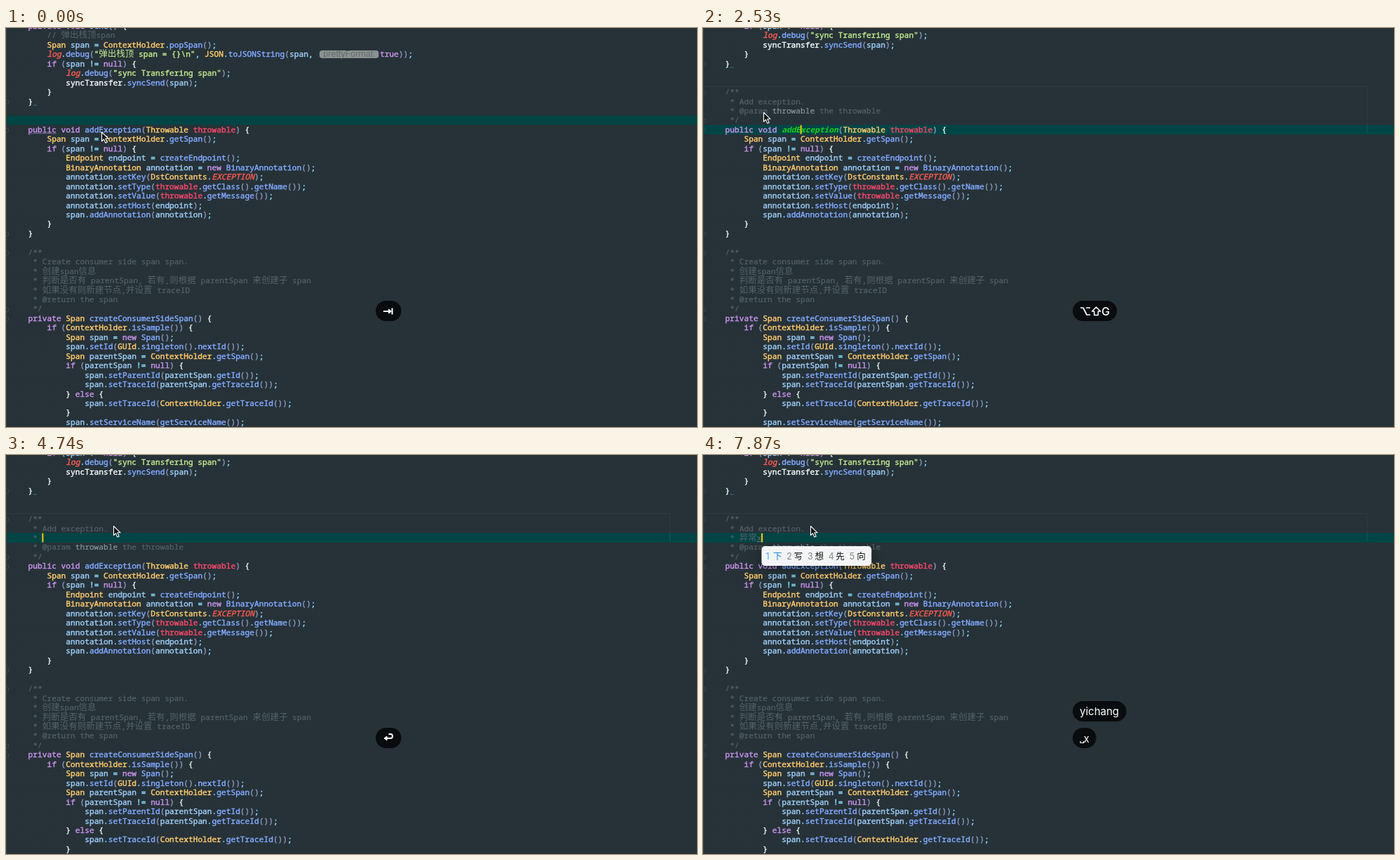
These frames come from a looping animation (985x569 px, 8000 ms). An HTML page with a canvas:

```html
<!DOCTYPE html>
<html lang="zh">
<head>
<meta charset="utf-8">
<title>Javadoc editing</title>
<style>
html, body { margin: 0; width: 100%; height: 100%; overflow: hidden; background: #263238; }
canvas { display: block; }
</style>
</head>
<body>
<canvas id="stage" width="985" height="569"></canvas>
<script>
const ctx = document.getElementById('stage').getContext('2d');
const LOOP = 8000, CW = 6.717, CJK = 12.5, LH = 13.45, LEFT = 31.6, TOP = -3.05;
const MONO = '"Noto Sans Mono", "DejaVu Sans Mono", monospace';
const HAN = '"Noto Sans CJK SC", "Noto Sans CJK", sans-serif';
const UI = 'Inter, "Liberation Sans", sans-serif';

const C = {
  bg: '#263238', row: '#004545', comment: '#546369', param: '#87969b',
  key: '#c792ea', type: '#ffcb6b', call: '#82aaff', local: '#9ccbf5',
  str: '#c3e88d', red: '#f7476a', stat: '#fa5b50', paren: '#8795b8',
  brace: '#e6f0f0', op: '#89ddff', white: '#f4f8f8', hit: '#12cf1e', caret: '#ffcc00'
};

const head = String.raw`private void send() {
    // 弹出栈顶span
    Span span = ContextHolder.popSpan();
    log.debug("弹出栈顶 span = {}\n", JSON.toJSONString(span, §true));
    if (span != null) {
        log.debug("sync Transfering span");
        syncTransfer.syncSend(span);
    }
}

`.split('\n');

const doc = ['/**', ' * Add exception.', ' * @param throwable the throwable', ' */'];

const body = `public void addException(Throwable throwable) {
    Span span = ContextHolder.getSpan();
    if (span != null) {
        Endpoint endpoint = createEndpoint();
        BinaryAnnotation annotation = new BinaryAnnotation();
        annotation.setKey(DstConstants.EXCEPTION);
        annotation.setType(throwable.getClass().getName());
        annotation.setValue(throwable.getMessage());
        annotation.setHost(endpoint);
        span.addAnnotation(annotation);
    }
}

/**
 * Create consumer side span span.
 * 创建span信息
 * 判断是否有 parentSpan, 若有,则根据 parentSpan 来创建子 span
 * 如果没有则新建节点,并设置 traceID
 * @return the span
 */
private Span createConsumerSideSpan() {
    if (ContextHolder.isSample()) {
        Span span = new Span();
        span.setId(GUId.singleton().nextId());
        Span parentSpan = ContextHolder.getSpan();
        if (parentSpan != null) {
            span.setParentId(parentSpan.getId());
            span.setTraceId(parentSpan.getTraceId());
        } else {
            span.setTraceId(ContextHolder.getTraceId());
        }
        span.setServiceName(getServiceName());`.split('\n');

// Timed states: the last entry whose time has passed is in force.
const rows = [[0, 10], [150, 11], [2970, 8], [4600, 9]];
const carets = [[0, 0], [150, 139.1], [600, 0], [1500, 139.1], [1940, 0], [2380, 139.1],
  [2830, 0], [2970, 145.8], [3550, 0], [4000, 145.8], [4600, -1]];
const mouse = [[0, 136, 148], [1790, 128, 142], [1940, 112, 133], [2090, 98, 126],
  [2230, 90, 122], [2380, 86, 120], [2680, 104, 114], [2830, 140, 104], [2970, 153, 101]];
const bulbs = [[0, 0], [1050, 130.5], [1500, 0], [4150, 101.5], [4600, 0]];
const pills = [[0, 'tab', 1], [600, 'tab', .6], [750, 'tab', .25], [900, '', 0],
  [1350, '⌥⇧G', 1], [3410, '⌥⇧G', .5], [3550, '', 0], [4600, 'ret', .6], [4740, 'ret', 1],
  [5790, 'y', 1], [5940, 'yi', 1], [6230, 'yic', 1], [6380, 'yich', 1], [6530, 'yicha', 1],
  [6670, 'yichan', 1], [6820, 'yichang', 1], [7570, '␣', 1], [7870, '␣x', 1]];
const upper = [[0, '', 0], [5790, 'ret', 1], [6530, 'ret', .5], [6670, '', 0], [7570, 'yichang', 1]];
const input = [[0, '', '', ''],
  [5790, '', 'y', '有 一 与 也 要'], [5940, '', 'yi', '一 以 已 亿 意'],
  [6230, '', 'yi c', '溢出 异常 易餐 翼侧 一茶'], [6380, '', 'yi ch', '溢出 异常 一处 一场 一茶'],
  [6530, '', 'yi cha', '异常 一茶 一查 一差 一场'], [6670, '', 'yi chan', '异常 一产 易产 一场 一颤'],
  [6820, '', 'yi chang', '异常 一场 一长 一厂 易常'],
  [7570, '异常', '', ''], [7870, '异常', 'x', '下 写 想 先 向']];

const at = (list, t) => list.filter(e => e[0] <= t).pop();
const rowY = r => TOP + LH * r;
const isHan = s => /[\u2e80-\u9fff]/.test(s);
const width = s => [...s].reduce((w, c) => w + (isHan(c) ? CJK : CW), 0);

// A thin outline gives code its medium weight.
function text(s, x, y, color, font, outline = 0) {
  ctx.font = font;
  ctx.fillStyle = color;
  ctx.fillText(s, x, y);
  if (!outline) return;
  ctx.strokeStyle = color;
  ctx.lineWidth = outline;
  ctx.lineJoin = 'round';
  ctx.strokeText(s, x, y);
}

function box(x, y, w, h, r, color) {
  ctx.fillStyle = color;
  ctx.beginPath();
  ctx.roundRect(x, y, w, h, r);
  ctx.fill();
}

function line(x1, y1, x2, y2, color, w = 1) {
  ctx.strokeStyle = color;
  ctx.lineWidth = w;
  ctx.beginPath();
  ctx.moveTo(x1, y1);
  ctx.lineTo(x2, y2);
  ctx.stroke();
}

// Draws one run on the character grid and returns the next x.
function run(s, x, y, color, style = '500', outline = .45) {
  for (const part of s.match(/[\u2e80-\u9fff]+|[^\u2e80-\u9fff]+/g) || []) {
    if (isHan(part)) text(part, x, y, color, `${CJK}px ${HAN}`);
    else text(part, x, y, color, `${style} ${CW / .6}px ${MONO}`, outline);
    x += width(part);
  }
  return x;
}

function hint(x, y) {
  box(x + 2.5, y - 9.3, 84.5, 11, 4, '#8b9291');
  text('prettyFormat:', x + 8, y - .5, '#626c6d', '12.5px "Liberation Sans", Arial, sans-serif');
  return x + 88.6;
}

function look(tok, next, hot) {
  if (tok[0] === '"') return [C.str];
  if (/^(public|private|void|if|else|new|null|true)$/.test(tok)) return [C.key];
  if (tok === 'log' || tok === 'EXCEPTION') return [C.stat, 'italic 500'];
  if (tok === 'throwable') return [C.red];
  if (tok === 'syncTransfer') return [C.white];
  if (tok === 'addException' && hot) return [C.hit, 'italic 700', 0];
  if (/^\w/.test(tok)) {
    if (next === '(') return [C.call];
    return [/^[A-Z]/.test(tok) ? C.type : C.local];
  }
  if (/[()]/.test(tok)) return [C.paren];
  return [/[{}]/.test(tok) ? C.brace : C.op];
}

function codeLine(s, cy, hot) {
  const y = cy + 4, indent = s.search(/\S/);
  if (indent < 0) return;
  ctx.fillStyle = '#2d3b42';
  for (let i = -4; i < indent; i++) ctx.fillRect(LEFT + CW * (i + .4), cy, 1, 1);
  if (indent < 2 && /^(\/\*|public|private|}| \*\/)/.test(s)) {
    ctx.strokeStyle = '#3a4a51';
    ctx.lineWidth = 1;
    ctx.beginPath();
    ctx.arc(1, cy + 1, 3, -1.5, 1.5);
    ctx.stroke();
  }
  let x = LEFT + CW * indent;
  s = s.slice(indent);
  if (/^(\/|\*)/.test(s)) {
    for (const p of s.split(/(?<=@param )(throwable)/)) {
      x = run(p, x, y, p === 'throwable' ? C.param : C.comment, '500', .2);
    }
    return;
  }
  const toks = s.match(/"[^"]*"|\w+|\s+|[(){}§]|[^\w\s(){}"§]+/g);
  toks.forEach((tok, i) => {
    if (tok === '§') x = hint(x, y);
    else if (/\S/.test(tok)) x = run(tok, x, y, ...look(tok, toks[i + 1], hot));
    else x += width(tok);
  });
}

function icon(d, x, y, w, fill) {
  ctx.save();
  ctx.translate(x, y);
  const p = new Path2D(d);
  if (fill) {
    ctx.fillStyle = fill;
    ctx.fill(p);
  }
  ctx.strokeStyle = '#fff';
  ctx.lineWidth = w;
  ctx.lineJoin = 'round';
  ctx.stroke(p);
  ctx.restore();
}

function pill(name, y, alpha) {
  if (!name) return;
  const x = 527, font = `15px ${UI}`;
  const fixed = { tab: 36.5, ret: 36.5, '⌥⇧G': 63, '␣': 29, '␣x': 33.5 };
  ctx.font = font;
  ctx.globalAlpha = alpha;
  box(x, y, fixed[name] || ctx.measureText(name).width + 20.5, 29, 14.5, '#090c0e');
  if (name === 'tab') {
    icon('M11 15h8M23.5 10.5v9', x, y, 2);
    icon('M18.5 12l4 3-4 3z', x, y, 1, '#fff');
  } else if (name === 'ret') {
    icon('M15 15h6a3 3 0 0 0 0-6h-2.5', x, y, 1.9);
    icon('M16 12l-4 3 4 3z', x, y, 1, '#fff');
  } else if (name === '⌥⇧G') {
    icon('M11 10h4l5 10h5M19 10h6', x, y, 1.7);
    icon('M33.5 9l6 6h-3.2v5.5h-5.6v-5.5h-3.2z', x, y, 1.5);
    text('G', x + 41, y + 20.5, '#fff', `500 16px ${UI}`);
  } else if (name[0] === '␣') {
    icon('M11 19v2.5h4.5v-2.5', x, y, 1.2);
    text(name.slice(1), x + 15.5, y + 20.5, '#fff', font);
  } else text(name, x + 10, y + 20, '#fff', font);
  ctx.globalAlpha = 1;
}

function bulb(y) {
  for (let i = 0; i < 7; i++) {
    const a = Math.PI * (.85 + i * 1.3 / 6), c = Math.cos(a), s = Math.sin(a);
    line(18 + c * 5, y + s * 5, 18 + c * 7, y + s * 7, '#f5c518');
  }
  ctx.fillStyle = '#ffdc28';
  ctx.beginPath();
  ctx.arc(18, y, 4, 0, 7);
  ctx.fill();
  ctx.fillRect(16, y + 2, 4, 3);
  ctx.fillStyle = '#b9c0c2';
  ctx.fillRect(16, y + 5, 4, 2);
}

function candidates(x, words) {
  const pitch = 17.3 + CJK * words[0].length;
  ctx.save();
  ctx.shadowColor = 'rgba(0,0,0,.4)';
  ctx.shadowBlur = 16;
  ctx.shadowOffsetY = 4;
  box(x, 130, 7.7 + pitch * words.length, 28, 5, '#f3f4f5');
  ctx.restore();
  words.forEach((w, i) => {
    const px = x + 6 + i * pitch;
    text(i + 1, px, 149, i ? '#858889' : '#58a4e8', `12.5px ${UI}`);
    text(w, px + 10.5, 149, i ? '#111' : '#1680dc', `${CJK}px ${HAN}`);
  });
}

function draw(t) {
  const hasDoc = t >= 1500, hasLine = t >= 4600;
  const row = at(rows, t)[1], mid = rowY(row);
  const top = Math.round(mid - LH / 2), bottom = Math.round(mid + LH / 2);
  const [, done, typing, words] = at(input, t);
  ctx.fillStyle = C.bg;
  ctx.fillRect(0, 0, 985, 569);
  ctx.fillStyle = C.row;
  ctx.fillRect(0, top, 985, bottom - top);
  line(.5, 0, .5, 569, '#35434a');
  if (hasDoc) {
    line(0, 83.5, 947, 83.5, '#2e3d44');
    line(946.5, 83, 946.5, top, '#2b393f');
  }
  if (row !== 10) line(946.5, top, 946.5, bottom, '#1a5557');

  const lines = [...head, ...(hasDoc ? doc : []), ...body];
  if (hasLine) lines.splice(head.length + 2, 0, ' * ' + done + typing);
  const shift = hasDoc ? 4 : 0;
  const hot = t >= 450 && t < 3410;
  lines.forEach((s, i) => codeLine(s, rowY(i - shift), hot));

  const mark = rowY(8 - shift) + 5.5;
  line(39, mark, 44, mark, '#32727a');
  if (!hasDoc) line(LEFT, 150.5, LEFT + 6 * CW, 150.5, '#7d6d98', .8);

  let cx = at(carets, t)[1];
  if (cx < 0) {
    const start = LEFT + 3 * CW + width(done);
    cx = start + width(typing);
    if (typing) line(start, mid + 5.5, cx, mid + 5.5, '#64797c');
  }
  if (cx) {
    ctx.fillStyle = C.caret;
    ctx.fillRect(cx - .4, mid - 6.4, 2, 12.8);
  }
  const by = at(bulbs, t)[1];
  if (by) bulb(by);
  if (words) candidates(cx, words.split(' '));

  const [, up, upAlpha] = at(upper, t);
  const [, low, lowAlpha] = at(pills, t);
  pill(up, 351, upAlpha);
  pill(low, 389, lowAlpha);

  const [, mx, my] = at(mouse, t);
  icon('M0 0v13l3-2.8 2.3 5.2 2.4-1-2.3-5.1h4.2z', mx + .5, my + .5, 1.1, '#101416');
}

const begin = performance.now();
function tick() {
  draw((performance.now() - begin) % LOOP);
  requestAnimationFrame(tick);
}
tick();
</script>
</body>
</html>
```
